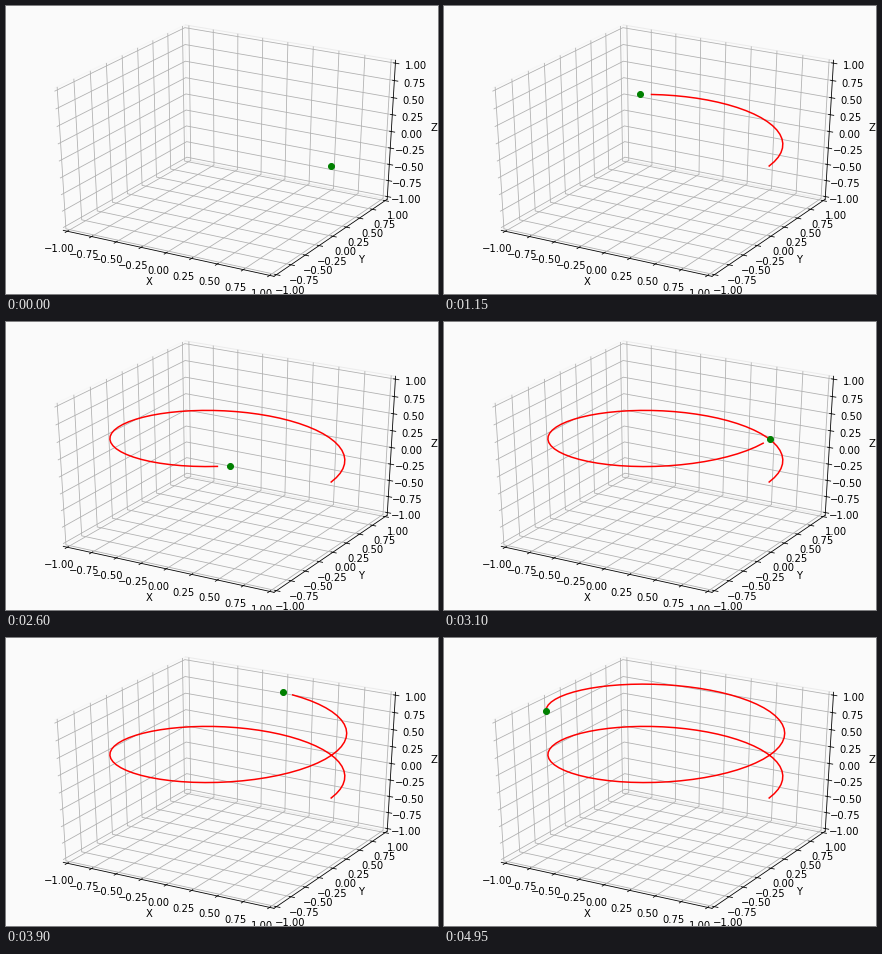
Recreate the animation shown at these times as a matplotlib script. Size 432x288 px, loop 5000 ms.

```python
import matplotlib.pyplot as plt
import numpy as np
from matplotlib.animation import FuncAnimation

STEPS = 100
BACKGROUND = "#fafafa"
LIMIT = 25 / 24
TICKS = np.linspace(-1, 1, 9)

angle = np.linspace(0, 10, STEPS)
helix = np.array([np.cos(angle), np.sin(angle), np.linspace(0, 1, STEPS)])

fig = plt.figure(figsize=(6, 4), dpi=72, facecolor=BACKGROUND)
ax = fig.add_axes([0, 0, 1, 1], projection="3d", facecolor=BACKGROUND)

# Let the cube stretch with the wide figure instead of staying square.
ax.apply_aspect = lambda position=None: None
# Zoom cancels the built-in scale, so the data range spans a unit cube.
ax.set_box_aspect((1, 1, 1), zoom=np.sqrt(3) / 1.8294640721620434)
ax.view_init(elev=30, azim=-60)

trail, = ax.plot([], [], [], "r-", lw=1.5)
dot, = ax.plot([], [], [], "go", ms=6)

ax.set(xlim=(-LIMIT, LIMIT), ylim=(-LIMIT, LIMIT), zlim=(-LIMIT, LIMIT),
       xticks=TICKS, yticks=TICKS, zticks=TICKS,
       xlabel="X", ylabel="Y", zlabel="Z")

for axis, grey in zip((ax.xaxis, ax.yaxis, ax.zaxis), (0.963, 0.925, 0.943)):
    axis.pane.set(fill=False, alpha=1, edgecolor=str(grey))


def update(i):
    trail.set_data_3d(*helix[:, :i])
    dot.set_data_3d(*helix[:, i:i + 1])
    return trail, dot


anim = FuncAnimation(fig, update, frames=STEPS, interval=50, repeat=True)
plt.show()
```
